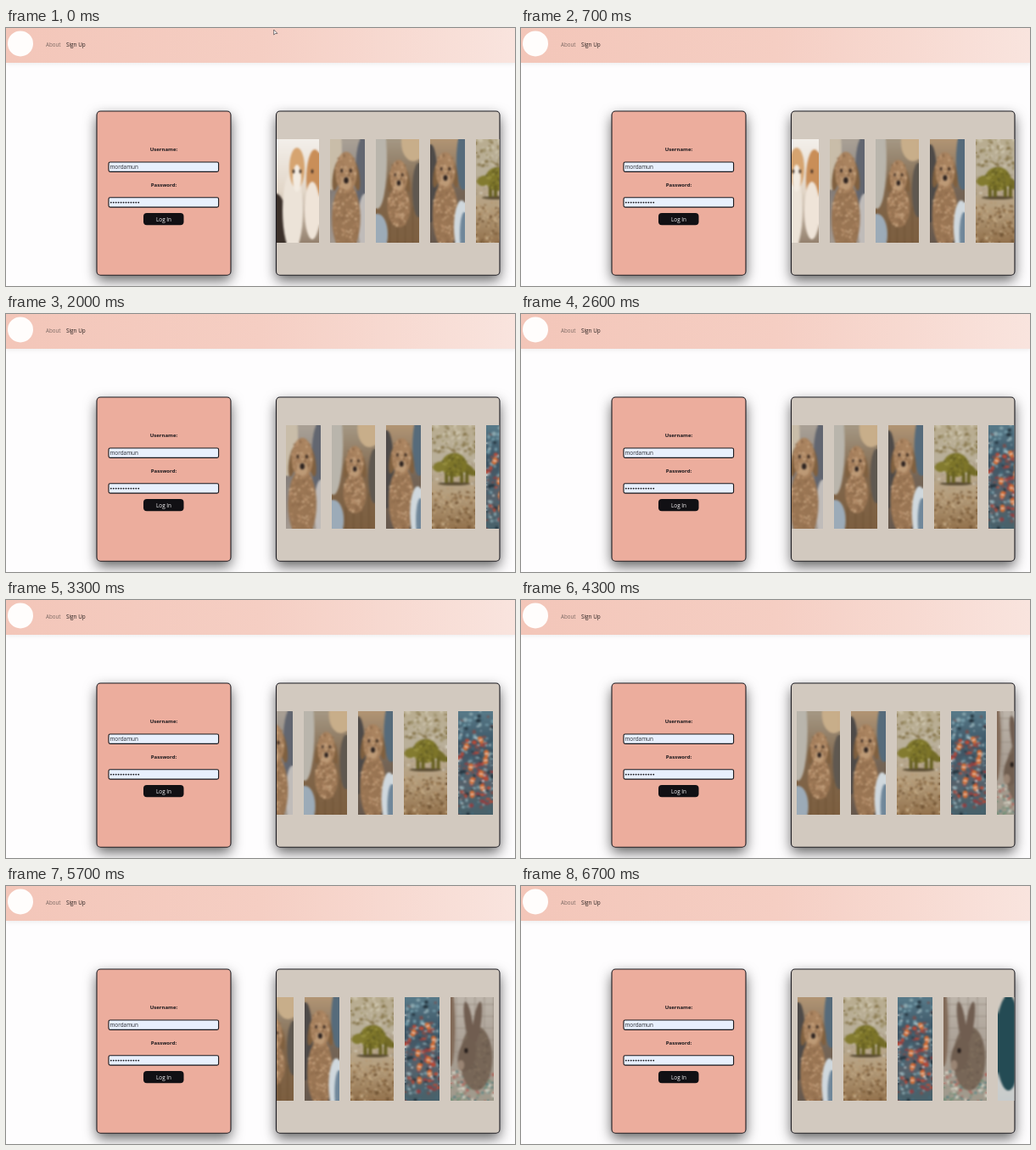
Recreate the animation shown at these times as an HTML page with a canvas. Size 600 by 304 pixels, loop 6800 ms.

```html
<!DOCTYPE html>
<html lang="en">
<head>
<meta charset="utf-8">
<title>Log in</title>
<style>
html, body { margin: 0; width: 100%; height: 100%; overflow: hidden; background: #fefdfe; }
canvas { display: block; width: 600px; height: 304px; }
</style>
</head>
<body>
<canvas id="stage" width="600" height="304"></canvas>
<script>
const LOOP = 6800, STEP = 100, SPEED = 0.0259;
const TOP = 131, PIC_H = 122, WIDE = 51, SLIM = 41, GAP = 13, START = 318;
const FONT = '"Open Sans", "Noto Sans", sans-serif';
const FUR = ['#b8906c', '#8d6a4b', '#c9a682', '#a07a58'];
const stage = document.getElementById('stage').getContext('2d');

function layer(w, h) {
  const c = document.createElement('canvas');
  c.width = w;
  c.height = h;
  return c.getContext('2d');
}

function seeded(seed) {
  return () => (seed = (seed * 16807) % 2147483647) / 2147483647;
}

function oval(g, color, x, y, rx, ry = rx, turn = 0) {
  g.fillStyle = color;
  g.beginPath();
  g.ellipse(x, y, rx, ry, turn, 0, 7);
  g.fill();
}

function rect(g, color, x, y, w, h) {
  g.fillStyle = color;
  g.fillRect(x, y, w, h);
}

function fade(g, w, ...colors) {
  const f = g.createLinearGradient(0, 0, 0, PIC_H);
  colors.forEach((c, i) => f.addColorStop(i / (colors.length - 1), c));
  rect(g, f, 0, 0, w, PIC_H);
}

// seeded dabs filling an ellipse
function dabs(g, seed, n, colors, x, y, rx, ry, size) {
  const r = seeded(seed * 7919);
  for (let i = 0; i < n; i++) {
    const a = r() * Math.PI * 2, d = Math.sqrt(r());
    oval(g, colors[i % colors.length], x + Math.cos(a) * d * rx, y + Math.sin(a) * d * ry,
      size * (0.5 + r()), size * (0.5 + r()));
  }
}

// seeded dabs filling a band across the picture
function grain(g, seed, n, colors, w, y, h, size) {
  const r = seeded(seed * 7919);
  for (let i = 0; i < n; i++) {
    oval(g, colors[i % colors.length], r() * w, y + r() * h, size * (0.5 + r()), size * (0.4 + r()));
  }
}

function curlyDog(g, x, y, s, bodyH) {
  const bodyY = y + 12 + bodyH;
  oval(g, '#997553', x, bodyY, 16 * s, bodyH);
  dabs(g, 31, 140, FUR, x, bodyY, 15 * s, bodyH, 1.3);
  for (const side of [-1, 1]) oval(g, '#80603f', x + side * 11 * s, y + 4, 4 * s, 17 * s, -side * 0.15);
  oval(g, '#a9835f', x, y, 12 * s, 23 * s);
  dabs(g, 57, 70, FUR, x, y, 12 * s, 23 * s, 1.3);
  oval(g, '#bd9a76', x, y + 12 * s, 6 * s, 8 * s);
  for (const side of [-1, 1]) oval(g, '#3a2a20', x + side * 5 * s, y - 2, 1.5 * s, 2.4 * s);
  oval(g, '#2b211e', x, y + 9 * s, 2.6 * s, 3.6 * s);
}

function puppies(g) {
  fade(g, WIDE, '#f3efea', '#e2d6c8', '#94816e');
  oval(g, '#3b302a', 0, 112, 15, 48);
  oval(g, '#ece3d8', 20, 84, 12, 48);
  oval(g, '#d6a470', 25, 34, 9, 24);
  oval(g, '#f3ebe1', 25, 46, 5, 16);
  oval(g, '#c98e58', 46, 48, 10, 36);
  oval(g, '#efe4d8', 43, 84, 9, 34);
  for (const x of [21, 29, 43]) oval(g, '#3b2b23', x, 38, 1.3, 2.4);
}

function dogOnSofa(g) {
  fade(g, SLIM, '#aaa196', '#847d79', '#a39990');
  oval(g, '#c9bda9', 2, 14, 12, 46);
  oval(g, '#626670', 38, 40, 8, 42);
  oval(g, '#c0bcba', 41, 98, 8, 34);
  curlyDog(g, 19, 39, 1.05, 42);
}

function dogOnFloor(g) {
  fade(g, WIDE, '#a59884', '#80664b', '#7d5f40');
  oval(g, '#b9b5ac', 2, 24, 11, 58);
  oval(g, '#c8ae8a', 44, 4, 14, 22);
  oval(g, '#5f5850', 50, 60, 7, 32);
  for (let x = 16; x < WIDE; x += 9) rect(g, '#6c5034', x, 80, 0.8, 42);
  curlyDog(g, 27, 44, 0.85, 24);
  oval(g, '#9cabb8', 2, 112, 12, 24);
}

function dogByWindow(g) {
  fade(g, SLIM, '#b29574', '#756556', '#66584d');
  oval(g, '#4e4a48', 1, 52, 8, 46);
  oval(g, '#566b7b', 39, 24, 8, 36);
  curlyDog(g, 18, 37, 0.95, 40);
  oval(g, '#d0d8dd', 37, 104, 9, 32);
  oval(g, '#70879a', 40, 112, 5, 26);
}

function dinosaur(g) {
  fade(g, WIDE, '#b9ad90', '#b9af9a', '#b59e7d', '#93724d');
  grain(g, 5, 90, ['#8a7950', '#cdc4ad', '#a1946f'], WIDE, 0, 34, 1.8);
  grain(g, 8, 60, ['#d9d2c6', '#a99b85'], WIDE, 42, 28, 1.6);
  grain(g, 12, 180, ['#82623e', '#b6966d', '#6f5233', '#c6ad89'], WIDE, 74, 48, 1.3);
  oval(g, '#5c4e35', 26, 69, 19, 2);
  oval(g, '#746c28', 41, 51, 13, 5, 0.65);
  oval(g, '#7d7529', 26, 47, 15, 14);
  oval(g, '#837b30', 9, 49, 8, 6, -0.25);
  for (const x of [15, 21, 33, 39]) rect(g, '#686122', x, 54, 4, 14);
  dabs(g, 17, 50, ['#989041', '#625c24'], 26, 47, 15, 13, 1.2);
}

function reef(g) {
  fade(g, SLIM, '#587a89', '#3c5464', '#56616b', '#48616a');
  grain(g, 21, 150, ['#7399a6', '#263640', '#8ba8b0', '#456877', '#79504f'], SLIM, 0, PIC_H, 2);
  grain(g, 25, 45, ['#b84a38', '#8f4143'], SLIM, 34, 78, 2);
  const r = seeded(90210);
  for (let i = 0; i < 9; i++) {
    const x = 5 + r() * 31, y = 34 + i * 8, turn = r() - 0.5;
    oval(g, '#d66d35', x, y, 3, 4.5, turn);
    oval(g, '#e6ded4', x, y, 2.8, 0.8, turn);
  }
  grain(g, 29, 40, ['#dae2e2', '#b0c5cc'], SLIM, 10, 110, 1.1);
}

function rabbit(g) {
  fade(g, WIDE, '#bdb5ab', '#a99e93', '#a09a8c');
  for (let i = 0; i < 5; i++) {
    rect(g, '#958a7f', 0, 8 + i * 14, WIDE, 0.8);
    rect(g, '#958a7f', 6 + i * 11, 0, 0.8, 72);
  }
  oval(g, '#826b59', 0, 34, 5, 48);
  grain(g, 41, 130, ['#d2d0c2', '#74917a', '#b0695f', '#58807f'], WIDE, 86, 36, 1.5);
  oval(g, '#776657', 30, 72, 19, 38);
  dabs(g, 45, 90, ['#83725f', '#6b5b4e'], 31, 74, 17, 35, 1.3);
  for (const side of [-1, 1]) oval(g, '#705d50', 26 + side * 5, 30, 4.5, 25, side * 0.15);
  oval(g, '#705e50', 19, 68, 10, 20, 0.25);
  oval(g, '#211a18', 18, 63, 2, 3);
  oval(g, '#9a8574', 12, 80, 4, 6);
}

function tealShape(g) {
  fade(g, SLIM, '#d2c9bf', '#d5d3cf', '#c8cccc');
  oval(g, '#244b54', 12, 54, 15, 56);
}

const pictures = [
  [WIDE, puppies], [SLIM, dogOnSofa], [WIDE, dogOnFloor], [SLIM, dogByWindow],
  [WIDE, dinosaur], [SLIM, reef], [WIDE, rabbit], [SLIM, tealShape]
];

let left = START;
const strip = pictures.map(([w, paint]) => {
  const raw = layer(w, PIC_H), soft = layer(w, PIC_H);
  paint(raw);
  soft.drawImage(raw.canvas, 0, 0);
  soft.filter = 'blur(0.8px)';
  soft.drawImage(raw.canvas, 0, 0);
  const item = { img: soft.canvas, x: left, w };
  left += w + GAP;
  return item;
});

function panel(g, x, y, w, h, r, fill, line) {
  g.beginPath();
  g.roundRect(x, y, w, h, r);
  g.fillStyle = fill;
  g.fill();
  if (!line) return;
  g.shadowColor = 'transparent';
  g.strokeStyle = line;
  g.lineWidth = 1.1;
  g.stroke();
}

function card(g, x, w, fill) {
  g.save();
  g.shadowColor = 'rgba(0,0,0,.62)';
  g.shadowBlur = 15;
  g.shadowOffsetY = 6;
  panel(g, x, 98, w, 193.2, 4.5, fill, '#1d1c22');
  g.restore();
}

function field(g, y) {
  panel(g, 121, y, 129.6, 11.4, 1.8, '#e8f0fd', '#17161b');
}

function label(g, text, x, y, size, color, weight = 400, align = 'left') {
  g.font = `${weight} ${size}px ${FONT}`;
  g.fillStyle = color;
  g.textAlign = align;
  g.fillText(text, x, y);
}

function paintPage(g) {
  rect(g, '#fefdfe', 0, 0, 600, 304);
  const bar = g.createLinearGradient(0, 0, 600, 0);
  ['#f3c6b9', '#f5cec3', '#f9e4de'].forEach((c, i) => bar.addColorStop(i / 2, c));
  g.save();
  g.shadowColor = 'rgba(0,0,0,.08)';
  g.shadowBlur = 5;
  g.shadowOffsetY = 1;
  rect(g, bar, 0, 0, 600, 41);
  g.restore();
  oval(g, '#fffdfc', 17, 18.4, 15);
  label(g, 'About', 47, 22, 6.2, '#7c6963');
  label(g, 'Sign Up', 71, 22, 6.4, '#241d1c');

  card(g, 107, 158, '#ecad9d');
  card(g, 318.5, 263.5, '#d2c9bf');
  label(g, 'Username:', 186, 145, 6, '#19171b', 700, 'center');
  label(g, 'Password:', 186, 187, 6, '#19171b', 700, 'center');
  field(g, 158);
  field(g, 199.7);
  label(g, 'mordamun', 122.4, 166.2, 6.4, '#25272d');
  for (let i = 0; i < 12; i++) oval(g, '#17171c', 123.8 + i * 2.95, 205.6, 0.95);
  panel(g, 162, 218, 47.5, 14.2, 4, '#111014');
  label(g, 'Log In', 186, 228, 6.4, '#f5f3f5', 400, 'center');
}

const page = layer(600, 304);
paintPage(page);

function pointer(g, x, y) {
  g.beginPath();
  g.moveTo(x, y);
  g.lineTo(x, y + 6);
  g.lineTo(x + 1.7, y + 4.6);
  g.lineTo(x + 4.2, y + 4.4);
  g.closePath();
  g.fillStyle = '#fff';
  g.fill();
  g.strokeStyle = '#29262a';
  g.lineWidth = 0.6;
  g.stroke();
}

function draw(t) {
  const g = stage;
  g.drawImage(page.canvas, 0, 0);
  g.save();
  g.beginPath();
  g.rect(319, TOP, 262.5, PIC_H);
  g.clip();
  for (const { img, x, w } of strip) {
    const px = x - t * SPEED;
    if (px < 582 && px + w > 318) g.drawImage(img, px, TOP);
  }
  g.restore();
  if (t < 300) pointer(g, 315.7, 2 - t * 0.03);
}

const begin = performance.now();
function tick(now) {
  const t = Math.max(0, now - begin) % LOOP;
  draw(Math.floor(t / STEP) * STEP);
  requestAnimationFrame(tick);
}
draw(0);
requestAnimationFrame(tick);
</script>
</body>
</html>
```
